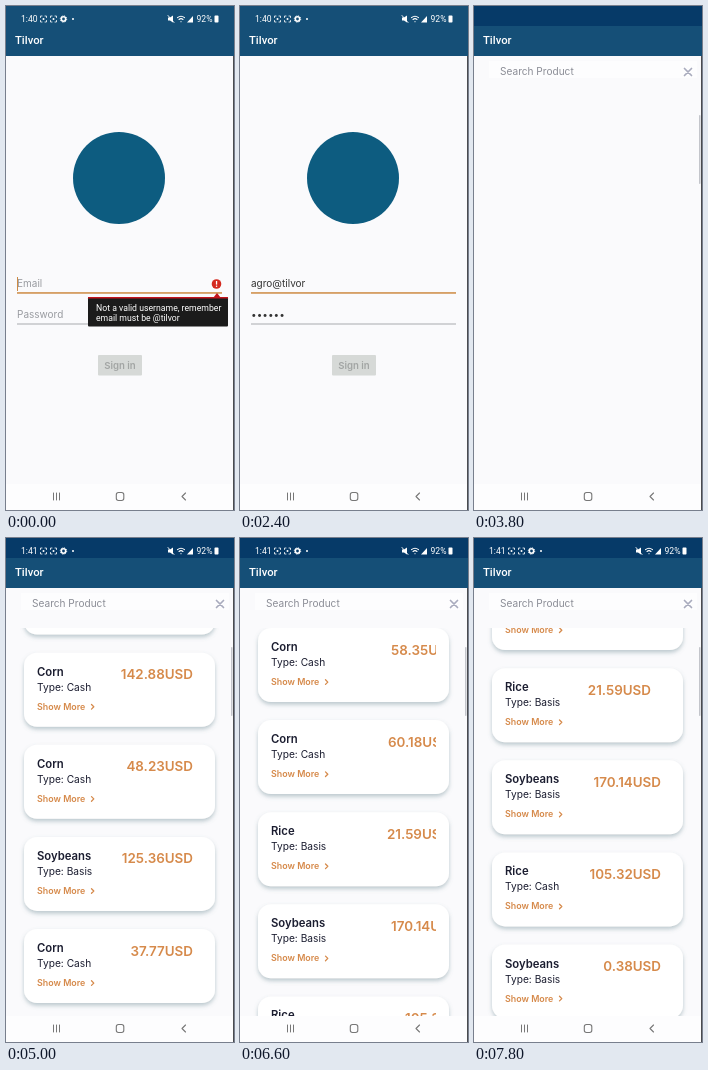
These frames come from a looping animation (228 px wide and 504 px high, 8000 ms). An HTML page:

```html
<!DOCTYPE html>
<html lang="en">
<head>
<meta charset="utf-8">
<title>Tilvor</title>
<style>
html, body { margin: 0; width: 100%; height: 100%; overflow: hidden; background: #fafafc; }
svg { display: block; width: 100%; height: 100%; }
text { font-family: Inter, sans-serif; white-space: pre; }
.sys { font-family: Roboto, sans-serif; }
.mid { text-anchor: middle; }
.line { fill: none; stroke-linecap: round; stroke-linejoin: round; }
</style>
</head>
<body>
<svg id="stage" viewBox="0 0 228 504" preserveAspectRatio="none"></svg>
<script>
const LOOP = 8000, STEP = 200;
const PITCH = 92.1, LIST_TOP = 90;
const BLUE = '#154f77', ORANGE = '#d68a4b', INK = '#1b1d30';

const rect = (x, y, w, h, fill, r = 0, extra = '') =>
  `<rect x="${x}" y="${y}" width="${w}" height="${h}" rx="${r}" fill="${fill}" ${extra}/>`;
const text = (x, y, size, fill, str, extra = '') =>
  `<text x="${x}" y="${y}" font-size="${size}" fill="${fill}" ${extra}>${str}</text>`;
const line = (d, color, w = 1) =>
  `<path class="line" d="${d}" stroke="${color}" stroke-width="${w}"/>`;
const group = (id, body, extra = '') => `<g id="${id}" ${extra}>${body}</g>`;

// product, type, price, optional stale left edge, optional settled right edge
const items = [
  ['Corn', 'Cash', '58.35', 151], ['Corn', 'Cash', '60.18', 148],
  ['Rice', 'Basis', '21.59', 147, 177], ['Soybeans', 'Basis', '170.14', 151],
  ['Rice', 'Cash', '105.32', 165], ['Soybeans', 'Basis', '0.38'],
  ['Corn', 'Basis', '96.41'], ['Corn', 'Cash', '142.88'],
  ['Corn', 'Cash', '48.23'], ['Soybeans', 'Basis', '125.36'],
  ['Corn', 'Cash', '37.77'], ['Rice', 'Cash', '64.05'],
  ['Soybeans', 'Cash', '118.72'], ['Corn', 'Basis', '83.90']
];

function card([name, type, price], i) {
  return `<g transform="translate(0 ${LIST_TOP + i * PITCH})">` +
    rect(18, 0, 191, 74, '#fff', 13, 'filter="url(#shadow)"') +
    text(31, 23, 11.3, INK, name, 'font-weight="600"') +
    text(31, 38, 10.2, INK, 'Type: ' + type) +
    text(31, 57, 8.9, ORANGE, 'Show More', 'font-weight="600"') +
    line('M85.5 51.8l2.3 2.3-2.3 2.3', ORANGE, 1.3) +
    `<g clip-path="url(#priceClip)">${text(187, 26.5, 13.4, ORANGE, price + 'USD',
      'class="price" font-weight="600" text-anchor="end"')}</g></g>`;
}

function statusIcons() {
  const bracket = x => line(`M${x} 11.5v-1.5h1.5M${x + 4.5} 10h1.5v1.5M${x + 6} 14.5v1.5h-1.5M${x + 1.5} 16h-1.5v-1.5`, '#fff', .8) +
    `<circle cx="${x + 3}" cy="13" r="1" fill="#fff"/>`;
  return '<text id="clock" class="sys" x="15" y="16" font-size="8.6" fill="#fff"></text>' +
    bracket(34.5) + bracket(44.5) +
    '<circle cx="57.5" cy="13" r="2.2" fill="none" stroke="#fff" stroke-width="1.6"/>' +
    '<circle cx="57.5" cy="13" r="3.2" fill="none" stroke="#fff" stroke-width="1" stroke-dasharray="1.2 1.3"/>' +
    '<circle cx="67" cy="13" r="1" fill="#fff"/>' +
    '<path d="M162 11.5h2l3-2v7l-3-2h-2z" fill="#fff"/>' + line('M162 9.5l6 7', '#fff', .9) +
    line('M171.5 11.7q3.5-3 7 0M173 13.5q2-1.7 4 0M175 15.6v.1', '#fff', 1.1) +
    '<path d="M181 16.5l6-6.5v6.5z" fill="#fff"/>' +
    text(190.5, 16, 8.6, '#fff', '92%', 'class="sys"') +
    rect(208.5, 9.6, 4, 7, '#fff', .8);
}

function errorTip(id, y, edgeY, triangle) {
  return group(id, `<path d="${triangle}" fill="#c3141c"/>` +
    rect(82, y, 140, 29, '#1b1b1b', 1) + rect(82, edgeY, 140, 1.5, '#c3141c') +
    text(90, y + 13, 8.7, '#fff', 'Not a valid username, remember', 'class="sys"') +
    text(90, y + 23, 8.7, '#fff', 'email must be @tilvor', 'class="sys"'));
}

function keyboard() {
  const key = (x, y, w, h, label, fill = '#fff', size = 12.5, ink = '#222') =>
    rect(x, y + 1, w, h, '#d3d6da', 4) + rect(x, y, w, h, fill, 4) +
    text(x + w / 2, y + h / 2 + size * .35, size, ink, label, 'class="sys mid"');
  const row = (chars, x, y, h) =>
    [...chars].map((c, i) => key(x + i * 22.1, y, 19.4, h, c)).join('');
  const dark = '#d8dbe0', gray = '#555';
  const tools = [20, 60, 100, 140, 180].map(x => `<circle cx="${x}" cy="308" r="9" fill="#e4e6e9"/>`).join('') +
    '<circle cx="20" cy="308" r="4.5" fill="none" stroke="#bbb"/><circle cx="26" cy="301" r="1.3" fill="#e9a070"/>' +
    line('M17.8 309q2.2 2.5 4.4 0M18.4 306.4v.2M21.6 306.4v.2', '#bbb') +
    rect(58.3, 303, 3.4, 6, gray, 1.7) + line('M56.5 307.5q0 3.5 3.5 3.5t3.5-3.5M60 311v2', gray) +
    line('M100 303.5l4 2.2v4.6l-4 2.2-4-2.2v-4.6z', gray) + '<circle cx="100" cy="308" r="1.6" fill="none" stroke="#555"/>' +
    '<circle cx="139.2" cy="307.2" r="3.2" fill="none" stroke="#555"/>' + line('M141.7 309.7l2.5 2.5', gray) +
    line('M176 304h5v5h-5zM182 306h2.5v6h-6v-2', gray) +
    [209.5, 213, 216.5].map(x => `<circle cx="${x}" cy="308" r="1" fill="#444"/>`).join('');
  return rect(0, 297, 228, 207, '#eef0f3') + tools +
    row('1234567890', 4.5, 325, 21) + row('qwertyuiop', 4.5, 352, 26) +
    row('asdfghjklñ', 4.5, 383, 26) + row('zxcvbnm', 37.5, 415, 25) +
    key(5, 415, 26, 25, '', dark) + line('M18 422.5l5 5h-2.5v4.5h-5v-4.5h-2.5z', '#444') +
    key(196, 415, 26, 25, '', dark) + line('M206 423.5h8v8h-8l-4-4zM208 425.5l4 4M212 425.5l-4 4', '#444') +
    key(5, 446, 26, 25, '!#1', dark, 10.5) + key(35, 446, 19, 25, '@') +
    key(58, 446, 80, 25, 'ES(US)', '#fff', 7.8, gray) + key(142, 446, 19, 25, '.') +
    key(165, 446, 27, 25, '.com', '#fff', 8.5) + key(196, 446, 26, 25, 'Sig.', dark, 9, '#2878c8');
}

const login =
  rect(0, 50, 228, 454, '#fafafc') + '<circle cx="113" cy="172" r="46" fill="#0d5c80"/>' +
  '<text id="email" x="11" y="281" font-size="10"></text>' +
  rect(11, 286.2, 205, 1.5, '#ce8a43') + rect(11, 271, 1, 14, '#ce8a43', 0, 'id="caret"') +
  group('badge', '<circle cx="210.5" cy="278" r="4.8" fill="#d42a20"/>' +
    rect(209.9, 275, 1.3, 3.6, '#fff') + rect(209.9, 279.6, 1.3, 1.3, '#fff')) +
  '<text id="password" x="11" y="312" font-size="10"></text>' + rect(11, 317.5, 205, 1, '#a9abb0') +
  rect(92, 349, 44, 20.5, '#d6d9d7', 1, 'id="signin"') +
  text(114, 362.5, 9.6, '#a2a5a4', 'Sign in', 'class="mid" font-weight="600"') +
  errorTip('tipBelow', 291.5, 291, 'M207 292l4-5 4 5z') +
  errorTip('tipAbove', 218.5, 246.5, 'M207 247l4.5 5 4-5z');

const catalog =
  rect(0, 50, 228, 454, '#fafafc') + rect(15, 55, 208, 17, '#fdfdfe') +
  text(26, 69, 10.1, '#8b8d96', 'Search Product') +
  line('M210.5 62.5l7 7M217.5 62.5l-7 7', '#a9abbd', 1.7) +
  `<g clip-path="url(#listClip)">${group('list', items.map(card).join(''))}</g>` +
  rect(225, 109, 1.5, 69, '#c3c5cb', .7);

const loading =
  rect(0, 20, 228, 458, '#2b3159', 0, 'opacity=".92"') + rect(225, 109, 2, 68, '#777c93', 1) +
  '<circle cx="113.5" cy="249" r="12.5" fill="none" stroke="#f4f4f6" stroke-width="2.2"/>' +
  group('spin', '<path class="line" d="M113.5 261.5A12.5 12.5 0 0 1 101.9 244.3" stroke="#d69a6b" stroke-width="2.2"/>') +
  group('toast', rect(70, 418, 86, 25, '#3a3f42', 12.5) +
    '<circle cx="89" cy="430.5" r="6" fill="#0e6d84"/>' +
    text(100, 434, 9.3, '#fff', 'Welcome !', 'class="sys"'));

const navbar = rect(0, 478, 228, 26, '#fdfdfe', 0, 'id="navBg"') +
  line('M47.5 487v7M50.5 487v7M53.5 487v7', '#777') +
  rect(110.3, 486.5, 7.5, 8, 'none', 2.2, 'stroke="#777" stroke-width="1.1"') +
  group('back', line('M179.5 487l-3.5 3.5 3.5 3.5', '#777', 1.1)) +
  group('hide', line('M174.5 489l3.5 3.5 3.5-3.5', '#777', 1.1));

const stage = document.getElementById('stage');
stage.innerHTML = `<defs>
  <clipPath id="listClip"><rect x="0" y="${LIST_TOP}" width="228" height="388"/></clipPath>
  <clipPath id="priceClip"><rect x="90" y="0" width="106" height="74"/></clipPath>
  <filter id="shadow" x="-10%" y="-20%" width="120%" height="150%">
    <feDropShadow dx="0" dy="2.5" stdDeviation="2.2" flood-color="#60828c" flood-opacity=".42"/>
  </filter></defs>` +
  group('login', login) + group('catalog', catalog) +
  rect(0, 0, 228, 50, BLUE) + rect(0, 0, 228, 20, '#063a68', 0, 'id="statusBg"') +
  text(9, 38.3, 11.3, '#fff', 'Tilvor', 'class="sys" font-weight="500"') +
  group('status', statusIcons()) + group('loading', loading) +
  group('keys', keyboard()) + navbar + rect(227, 50, 1, 454, '#4a4c50');

const $ = id => document.getElementById(id);
const show = (id, on) => $(id).setAttribute('display', on ? 'inline' : 'none');
const prices = [...document.querySelectorAll('.price')];

const scrollSteps = [[4400, 0], [5000, 620], [5600, 800], [5800, 800], [6400, 0], [6800, 0], [7800, 144]];
const typed = [[1600, 'a'], [1800, 'agro'], [2000, 'agro@tilvor']];

function track(steps, t) {
  if (t <= steps[0][0]) return steps[0][1];
  for (let i = 1; i < steps.length; i++) {
    const [t0, a] = steps[i - 1], [t1, b] = steps[i];
    if (t <= t1) return a + (b - a) * (t - t0) / (t1 - t0);
  }
  return steps.at(-1)[1];
}

function renderLogin(t) {
  const entry = typed.filter(([at]) => t >= at).at(-1);
  const invalid = t < 2000, keysUp = t >= 800 && t < 2400;
  $('email').textContent = entry ? entry[1] : 'Email';
  $('email').setAttribute('fill', entry ? '#333' : '#999ba0');
  $('caret').setAttribute('x', entry ? 11.5 + $('email').getComputedTextLength() : 11);
  $('password').textContent = t >= 2200 ? '••••••' : 'Password';
  $('password').setAttribute('fill', t >= 2200 ? '#333' : '#999ba0');
  show('caret', t < 2200);
  show('badge', invalid);
  show('tipBelow', invalid && !keysUp);
  show('tipAbove', invalid && keysUp);
  show('keys', keysUp);
  show('hide', keysUp);
  show('back', !keysUp);
  $('navBg').setAttribute('fill', keysUp ? '#eef0f3' : '#fdfdfe');
}

function renderCatalog(t) {
  show('list', t >= 4200);
  $('list').setAttribute('transform', `translate(0 ${-track(scrollSteps, t)})`);
  const stale = t >= 6200 && t < 7000;
  prices.forEach((el, i) => {
    const [, , , left, right = 187] = items[i];
    const shifted = stale && left;
    el.setAttribute('x', shifted ? left : t >= 7000 ? right : 187);
    el.setAttribute('text-anchor', shifted ? 'start' : 'end');
  });
}

function render(t) {
  const signedIn = t >= 2600;
  show('login', !signedIn);
  show('catalog', signedIn);
  show('statusBg', signedIn);
  show('status', !signedIn || t >= 4200);
  $('clock').textContent = signedIn ? '1:41' : '1:40';
  show('loading', signedIn && t < 3800);
  show('toast', t >= 2800);
  $('spin').setAttribute('transform', `rotate(${(t - 3000) * .36} 113.5 249)`);
  renderLogin(t);
  renderCatalog(t);
}

const start = performance.now();
function tick() {
  const t = (performance.now() - start) % LOOP;
  render(Math.floor(t / STEP) * STEP);
  requestAnimationFrame(tick);
}
tick();
</script>
</body>
</html>
```
